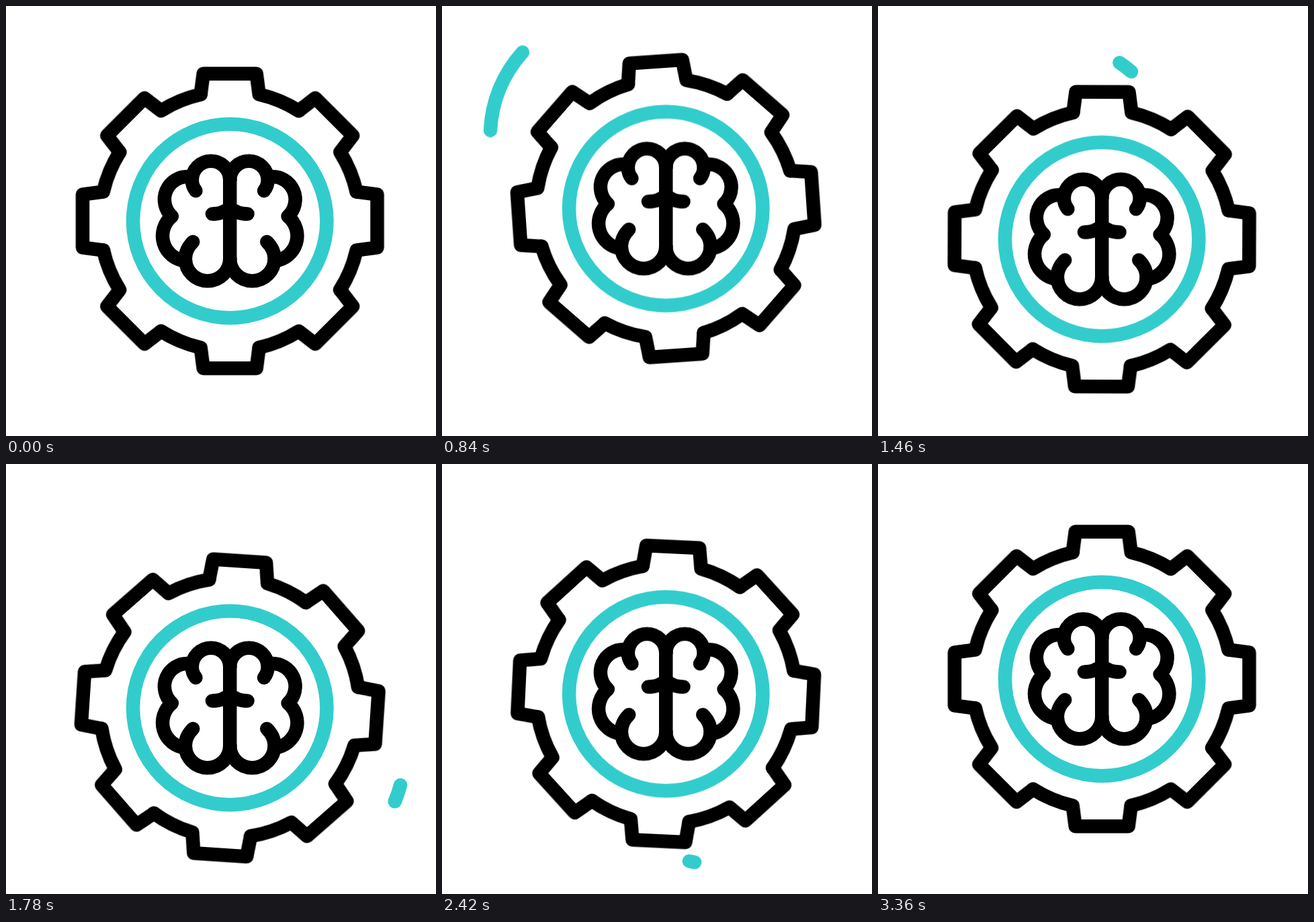
An HTML page for the animation above (3600 ms loop, 640 by 640 pixels).

```html
<!DOCTYPE html>
<html lang="en">
<head>
<meta charset="utf-8">
<title>Brain in a turning gear</title>
<style>
  @property --head { syntax: "<number>"; inherits: false; initial-value: 0; }
  @property --tail { syntax: "<number>"; inherits: false; initial-value: 0; }

  html, body { margin: 0; width: 100%; height: 100%; overflow: hidden; background: #fff; }
  svg { display: block; width: 100%; height: 100%; }

  svg * {
    animation-duration: 3600ms;
    animation-iteration-count: infinite;
    animation-timing-function: cubic-bezier(.333, 0, .667, 1);
  }

  .line { fill: none; stroke: #000; stroke-width: 20.5; stroke-linecap: round; stroke-linejoin: round; }
  .teal { stroke: #33cccc; }

  #scene { animation-name: bob; }
  #gear { animation-name: turn; animation-timing-function: linear; }

  .arc {
    stroke-dasharray: calc((var(--head) - var(--tail)) * 1px) 300px;
    stroke-dashoffset: calc(var(--tail) * -1px);
  }
  #left { animation-name: left-head, left-tail, left-show; }
  #right { animation-name: right-head, right-tail, right-show; }

  @keyframes bob {
    0%, 6.67% { transform: translateY(0); }
    23.33% { transform: translateY(-18.5px); }
    49.17% { transform: translateY(43px); }
    86.11%, 100% { transform: translateY(0); }
  }
  @keyframes turn {
    0%, 2.22% { transform: rotate(0deg); }
    23.33% { transform: rotate(130.9deg); }
    58.33% { transform: rotate(322.2deg); }
    76.67% { transform: rotate(405.5deg); animation-timing-function: cubic-bezier(.3, .47, .6, .95); }
    92.78%, 100% { transform: rotate(450deg); }
  }

  @keyframes left-head { 0%, 17.39% { --head: 0; } 33.5%, 100% { --head: 100; } }
  @keyframes left-tail { 0%, 31.5% { --tail: 0; } 42.06%, 100% { --tail: 100; } }
  @keyframes left-show {
    0%, 17.39% { opacity: 0; }
    17.4%, 42.05% { opacity: 1; }
    42.06%, 100% { opacity: 0; }
  }
  @keyframes right-head { 0%, 47.77% { --head: 0; } 56.94%, 100% { --head: 100; } }
  @keyframes right-tail { 0%, 57.78% { --tail: 0; } 68.33%, 100% { --tail: 100; } }
  @keyframes right-show {
    0%, 47.76% { opacity: 0; }
    47.77%, 68.32% { opacity: 1; }
    68.33%, 100% { opacity: 0; }
  }
</style>
</head>
<body>
<svg viewBox="0 0 640 640">
  <defs>
    <path id="tooth" d="M-43.5-188.5L-39.5-219.3H39.5L43.5-188.5A193.5 193.5 0 0 1 102.5-164"/>
    <g id="half">
      <path d="M0 259A28.2 28.2 0 0 0-56.4 259C-56.4 265-54 271-50.8 275"/>
      <path d="M-61 254A34 34 0 0 0-86.3 313A37.5 37.5 0 0 0-66 379.5"/>
      <path d="M0 376A33.2 33.2 0 0 1-66.4 376C-66.4 366-62 358-55 351"/>
      <path d="M-26.3 309.5Q-10 309.5 0 300"/>
    </g>
  </defs>

  <g id="scene" class="line">
    <path id="left" class="arc teal" pathLength="100" d="M72 203.5A185.3 185.3 0 0 1 377 70.5"/>
    <path id="right" class="arc teal" pathLength="100" d="M587 435A185.4 185.4 0 0 1 368 569"/>

    <g transform="translate(333.25 320)">
      <g id="gear">
        <use href="#tooth"/>
        <use href="#tooth" transform="rotate(45)"/>
        <use href="#tooth" transform="rotate(90)"/>
        <use href="#tooth" transform="rotate(135)"/>
        <use href="#tooth" transform="rotate(180)"/>
        <use href="#tooth" transform="rotate(225)"/>
        <use href="#tooth" transform="rotate(270)"/>
        <use href="#tooth" transform="rotate(315)"/>
      </g>
      <circle class="teal" r="144.2"/>
    </g>

    <g transform="translate(333.25 0)">
      <path d="M0 259V376"/>
      <use href="#half"/>
      <use href="#half" transform="scale(-1 1)"/>
    </g>
  </g>
</svg>
</body>
</html>
```
